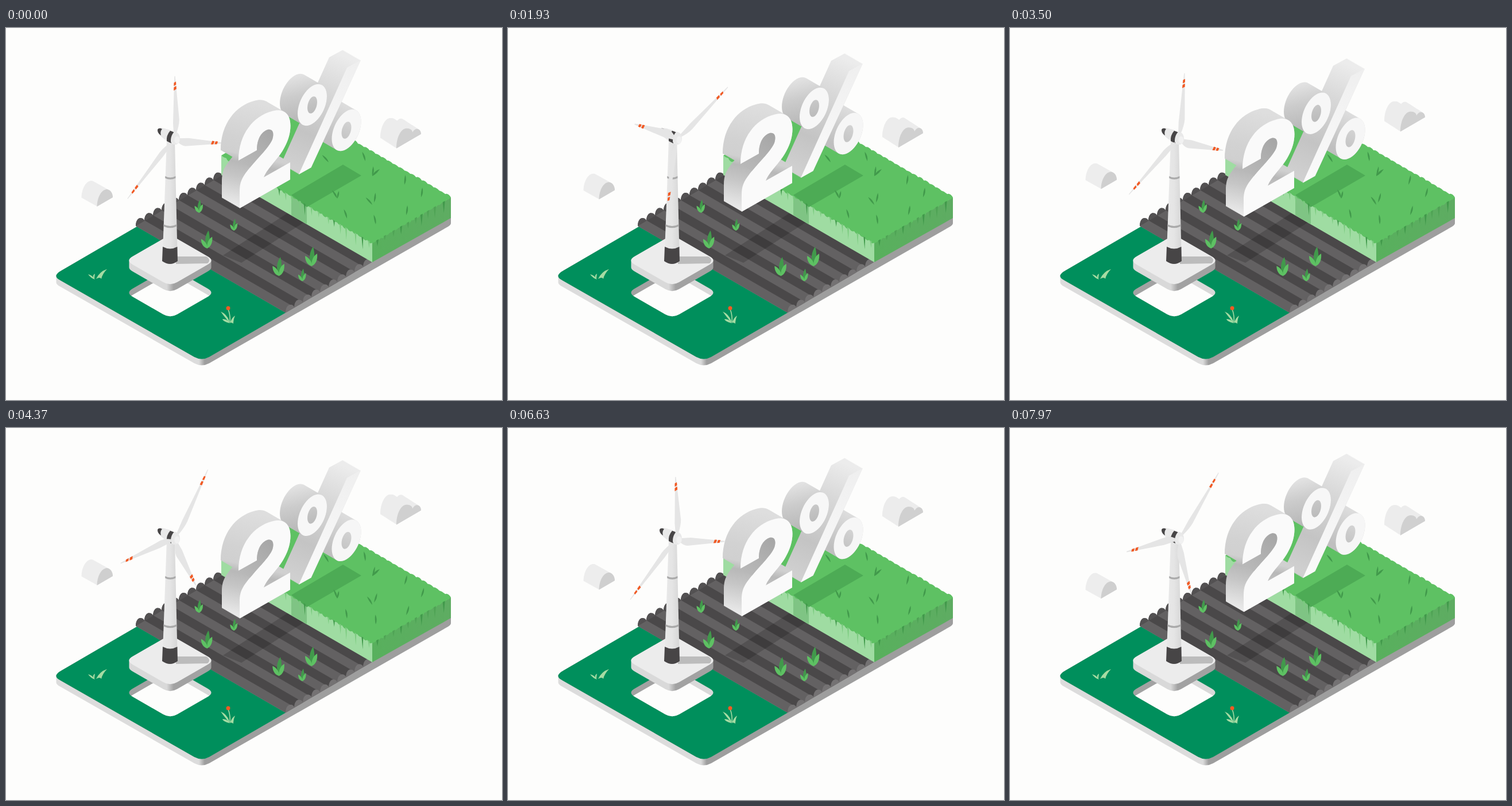
An HTML page that plays this animation: 864 px wide and 648 px high, repeating every 8 s.

```html
<!DOCTYPE html>
<html lang="en">
<head>
<meta charset="utf-8">
<title>Wind turbine on a field</title>
<style>
  html, body { margin: 0; width: 100%; height: 100%; overflow: hidden; background: #fdfdfc; }
  svg { display: block; width: 100vw; height: 100vh; }
</style>
</head>
<body>
<svg id="stage" viewBox="0 0 864 648"></svg>
<script>
const LOOP = 8000, PERIOD = 10000;
const PAPER = '#fdfdfc', LEAF = '#5ec163', LEAF_DARK = '#41994b', PALE = '#a6dba3', ORANGE = '#f15a24';

let seed = 7;
const random = () => (seed = (seed * 16807) % 2147483647) / 2147483647;
const path = (d, fill, more = '') => `<path d="${d}" fill="${fill}" ${more}/>`;
const at = (x, y, body) => `<g transform="translate(${x} ${y})">${body}</g>`;

function gradient(id, [x1, y1, x2, y2], stops) {
  const list = stops.map(([o, c]) => `<stop offset="${o}" stop-color="${c}"/>`).join('');
  return `<linearGradient id="${id}" gradientUnits="userSpaceOnUse" x1="${x1}" y1="${y1}" x2="${x2}" y2="${y2}">${list}</linearGradient>`;
}

// A flat face pushed along (dx, dy) to give it depth.
let sweeps = 0;
function solid(d, dx, dy, side, front) {
  const id = 'sweep' + sweeps++, n = Math.ceil(Math.max(Math.abs(dx), Math.abs(dy)) * 1.3);
  let copies = '';
  for (let i = 0; i <= n; i++)
    copies += `<path d="${d}" clip-rule="evenodd" transform="translate(${dx * i / n} ${dy * i / n})"/>`;
  return `<clipPath id="${id}">${copies}</clipPath>
    <rect width="864" height="648" fill="${side}" clip-path="url(#${id})"/>` +
    path(d, front, 'fill-rule="evenodd"');
}

function diamond(x, y) {
  return `M${x - 65.5} ${y - 7}l53.4-30.8Q${x} ${y - 44.8} ${x + 12.1} ${y - 37.8}l53.4 30.8` +
    `Q${x + 77.6} ${y} ${x + 65.5} ${y + 7}l-53.4 30.8Q${x} ${y + 44.8} ${x - 12.1} ${y + 37.8}` +
    `l-53.4-30.8Q${x - 77.6} ${y} ${x - 65.5} ${y - 7}z`;
}

// Ellipse lying in the upright plane that the digits and the rotor share.
function disc(cx, cy, rx, ry) {
  const points = Array.from({ length: 48 }, (_, i) => {
    const a = i * Math.PI / 24, x = rx * Math.sin(a);
    return `${(cx + .864 * x).toFixed(2)} ${(cy - .51 * x - ry * Math.cos(a)).toFixed(2)}`;
  });
  return 'M' + points.join('L') + 'z';
}
const ring = (cx, cy) => disc(cx, cy, 29.5, 33) + disc(cx, cy, 9.8, 14);

function ragged([ax, ay], [bx, by], n, height) {
  let d = '';
  for (let i = 0; i < n; i++) {
    const m = (i + .5) / n, e = (i + 1) / n, lift = height * (.4 + 1.2 * random());
    d += `Q${ax + (bx - ax) * m} ${ay + (by - ay) * m + lift} ${ax + (bx - ax) * e} ${ay + (by - ay) * e}`;
  }
  return d;
}

function ground() {
  const outline = 'M228 346L97 422.2Q79 432 95 439.7L328 573Q341 580 354 573L';
  const hole = diamond(286, 461);
  return solid(outline + '770 335Q780 329 770 323L512 178Z', 0, 11, 'url(#slabSide)', '#9e9e9e') +
    path(outline + '487 496Z', '#008f5c') +
    `<clipPath id="hole"><path d="${hole}"/></clipPath>` + path(hole, 'url(#holeSide)') +
    `<g clip-path="url(#hole)">${path(diamond(286, 472), PAPER)}</g>`;
}

function soil() {
  let out = '';
  for (let i = 9; i >= 0; i--) {
    const fill = i % 2 ? '#4a4849' : '#636162';
    out += at(226 + 15 * i, 345 - 8.8 * i,
      path('M0 0c0-9 4-14 8-14l261 151c4 0 7 2 7 5.2l-15 8.8z', fill) +
      path('M0 0c0-9 4-14 8-14c4 0 7 2 7 5.2z', '#535152') +
      path('M261 151c0-9 4-14 8-14c4 0 7 2 7 5.2z', '#747273'));
  }
  return out + path('M378 396L497 318L526 334L410 409Z', '#000', 'opacity=".16"');
}

function grass() {
  const left = [375, 222], front = [638, 374], right = [775, 295], back = [512, 143];
  const top = 'M375 222' + ragged(left, front, 30, 4) + ragged(front, right, 18, 4) +
    ragged(right, back, 26, -3.5) + 'L375 222Z';
  let out = path('M375 222L638 374V408L375 256Z', '#9fdca2') +
    path('M638 374L775 295V331L638 408Z', 'url(#grassSide)') +
    path('M497 290L524 306V342L497 326Z', '#7fc484') + path(top, LEAF) +
    path('M587 238L619 257L524 312L497 291Z', '#4dab55');
  for (let i = 0; i < 14; i++) {
    const x = 470 + i * 12 + 6 * random(), h = 8 + 14 * random();
    out += path(`M${x} ${222 + (x - 375) * .578}l3 1.7l-1 ${h}z`, i % 4 ? '#7ccb80' : LEAF_DARK);
  }
  for (let i = 0; i < 10; i++) {
    const x = 645 + i * 12.5 + 5 * random(), h = 9 + 13 * random();
    out += path(`M${x} ${374 - (x - 638) * .577}l4-2l-2 ${h}z`, i % 3 ? '#4fa355' : LEAF_DARK);
  }
  const blades = [[562, 234, -35], [626, 232, -12], [638, 258, 12], [577, 297, -25], [638, 308, -35], [641, 304, 15],
    [694, 273, 12], [723, 295, 14], [697, 326, 14], [594, 332, -12], [644, 342, -5]];
  for (const [x, y, tilt] of blades)
    out += at(x, y, `<g class="blade" data-tilt="${tilt}">${path('M0 0Q-3-9-2-17Q3-9 0 0Z', LEAF_DARK)}</g>`);
  return out + at(638, 258, path('M0 0Q3-9 13-12Q8-4 0 0Z', LEAF_DARK)) +
    at(577, 297, path('M0 0Q-1-8 3-13Q4-5 0 0Z', LEAF_DARK));
}

function plants() {
  const sprout = path('M1-2C-6-12-3-26 3-34C6-24 6-10 3-2Z', LEAF_DARK) +
    path('M1 0C-7-2-11-9-11-18C-4-15 1-8 1 0Z', LEAF) +
    path('M0 0C0-10 3-18 10-22C11-12 8-3 0 0Z', LEAF);
  const spots = [[336, 322, .68], [397, 353, .6], [350, 384, .92], [475, 432, .97], [532, 415, 1], [516, 441, .64]];
  return spots.map(([x, y, s]) => at(x, y, `<g transform="scale(${s})">${sprout}</g>`)).join('') +
    path('M155 438Q148 436 143 429Q151 431 155 438Z', PALE) +
    path('M152 434Q151 430 155 428Q154 433 154 437Z', PALE) +
    path('M157 437Q163 424 176 420Q168 428 166 437Q164 433 157 437Z', PALE) +
    path('M390 514Q381 504 374 494Q386 499 390 514Z', PALE) +
    path('M389 514Q378 511 377 507Q386 507 390 514Z', PALE) +
    path('M390 514Q393 505 399 501Q396 508 396 515Q393 512 390 514Z', PALE) +
    `<path d="M387 490Q391 500 390 512" stroke="${PALE}" stroke-width="1.6" fill="none"/>
     <circle cx="387" cy="488" r="3.5" fill="${ORANGE}"/>`;
}

function turbine() {
  const blade = path('M-2-8L-3.5-30L-.9-110H.7L9-30Q9-20 3-8Z', '#e5e5e5') +
    path('M-2.2-86L3.3-86L2.9-91.500L-2-91.500ZM-2-94L2.700-94L2.300-99.500L-1.800-99.500Z', ORANGE);
  const blades = [0, 120, 240].map(a => `<g transform="rotate(${a})">${blade}</g>`).join('');
  return solid(diamond(286, 405), 0, 12, 'url(#padSide)', '#ececec') +
    path('M296 398L349 398Q358 404 351 410L296 411Z', '#bcbcbc') +
    path('M280 196H294L298.5 390H273Z', 'url(#tower)') +
    path('M277.3 258Q286 263 295.4 258V261.5Q286 266 277.2 261.5Z', '#aaa') +
    path('M274.4 342Q286 348 297.4 342V345.5Q286 351 274.3 345.5Z', '#aaa') +
    path('M273 381Q286 388 298.4 381L299 406Q286 416 272 406Z', '#474546') +
    path('M268 174C275 174 284 177 291 180L294 203C286 201 274 193 268 187Z', '#e9e9e9') +
    path('M264 178C264 174 269 174 272 176C269 179 269 183 270 187C266 185 264 181 264 178Z', '#474546') +
    path('M286 179L294 182Q288 190 288 201L280 197Q279 187 286 179Z', '#474546') +
    `<g transform="translate(294 194) matrix(.864 -.51 0 1 0 0)"><g id="rotor">${blades}</g></g>` +
    path('M293 181C300 181 303 186 303 193C303 200 298 204 293 203C290 203 287 200 287 197C287 190 289 185 293 181Z', '#e9e9e9') +
    `<ellipse cx="298" cy="195" rx="4.5" ry="6.5" fill="#f1f1f1"/>`;
}

function percent() {
  const inner = 'C437 192 446 180 456 177C466 175 467 185 464 194C459 207 440 225 425 243';
  const two = 'M407 314L495 264V234L449 260C455 244 475 228 485 208C492 195 495.5 183 495.5 170' +
    `C495.5 148 482 139 463 145C432 153 405 184 405 231L437 213${inner}C411 260 407 268 407 285Z`;
  const slash = 'M594 69L618 56L531.5 243L510 255Z';
  return solid(ring(593, 178), -31, -18, 'url(#lowRing)', '#f6f6f6') +
    solid(slash, -31, -18, 'url(#slashSide)', 'url(#slashFront)') +
    solid(ring(533.5, 134), -31, -18, 'url(#highRing)', '#f7f7f7') +
    solid(two, -31, -18, 'url(#twoSide)', '#fafafa') +
    path(`M437 213${inner}L405 231Z`, 'url(#counter)');
}

const leftCloud = solid('M158.5 311C158.5 296 166 281 176 281C183 282 186 289 186 295Z',
  -27, -15, '#ededed', '#cfcfcf');
const rightCloud = solid('M680 209C680 190 688 174 698 174C704 174 708 177 708 181C713 171 723 174 723 184Z',
  -28, -18, '#ececec', '#d0d0d0');

const defs = [
  gradient('slabSide', [336, 0, 346, 0], [[0, '#dcdcdc'], [1, '#9e9e9e']]),
  gradient('padSide', [280, 0, 292, 0], [[0, '#d9d9d9'], [1, '#a2a2a2']]),
  gradient('holeSide', [280, 0, 292, 0], [[0, '#a2a2a2'], [1, '#d9d9d9']]),
  gradient('tower', [273, 0, 299, 0], [[0, '#e9e9e9'], [.5, '#e4e4e4'], [1, '#d6d6d6']]),
  gradient('grassSide', [638, 0, 775, 0], [[0, '#58b05d'], [1, '#5eac62']]),
  gradient('lowRing', [555, 190, 590, 125], [[0, '#bfbfbf'], [1, '#e0e0e0']]),
  gradient('highRing', [520, 165, 500, 85], [[0, '#b5b5b5'], [.6, '#cccccc'], [1, '#e2e2e2']]),
  gradient('slashSide', [580, 45, 495, 240], [[0, '#ececec'], [.3, '#d8d8d8'], [.7, '#c4c4c4'], [1, '#d0d0d0']]),
  gradient('slashFront', [606, 60, 522, 248], [[0, '#efefef'], [1, '#fafafa']]),
  gradient('twoSide', [425, 128, 385, 308], [[0, '#dedede'], [.35, '#d2d2d2'], [.5, '#d0d0d0'], [.58, '#b8b8b8'], [.72, '#c6c6c6'], [1, '#ececec']]),
  gradient('counter', [462, 180, 418, 238], [[0, '#a6a6a6'], [1, '#b8b8b8']])
].join('');

const stage = document.getElementById('stage');
stage.innerHTML = `<defs>${defs}</defs>` + ground() + soil() + grass() + plants() +
  `<g id="left">${leftCloud}</g><g id="right">${rightCloud}</g>` + turbine() +
  `<g id="digits">${percent()}</g>`;

const [left, right, rotor, digits] = ['left', 'right', 'rotor', 'digits'].map(id => document.getElementById(id));
const blades = [...stage.querySelectorAll('.blade')];
const ease = p => (1 - Math.cos(Math.PI * p)) / 2;

// Time and height of each turning point.
const RIGHT_STEPS = [[-4000, -43.5], [1000, 5.5], [5000, -43.5], [5200, -43.5], [11200, 5.5]];
function follow(steps, t) {
  const i = steps.findIndex(s => s[0] > t);
  const [t0, v0] = steps[i - 1], [t1, v1] = steps[i];
  return v0 + (v1 - v0) * ease((t - t0) / (t1 - t0));
}

const lift = (el, y) => el.setAttribute('transform', `translate(0 ${y.toFixed(2)})`);
const start = performance.now();
function draw(now) {
  const t = Math.max(0, now - start) % LOOP, wave = ease(2 * t / PERIOD);
  lift(digits, 18.5 * wave);
  lift(left, -38.5 * wave);
  lift(right, follow(RIGHT_STEPS, t));
  rotor.setAttribute('transform', `rotate(${360 * t / PERIOD})`);
  for (const b of blades) b.setAttribute('transform', `rotate(${+b.dataset.tilt + 10 * wave})`);
  requestAnimationFrame(draw);
}
draw(start);
</script>
</body>
</html>
```
